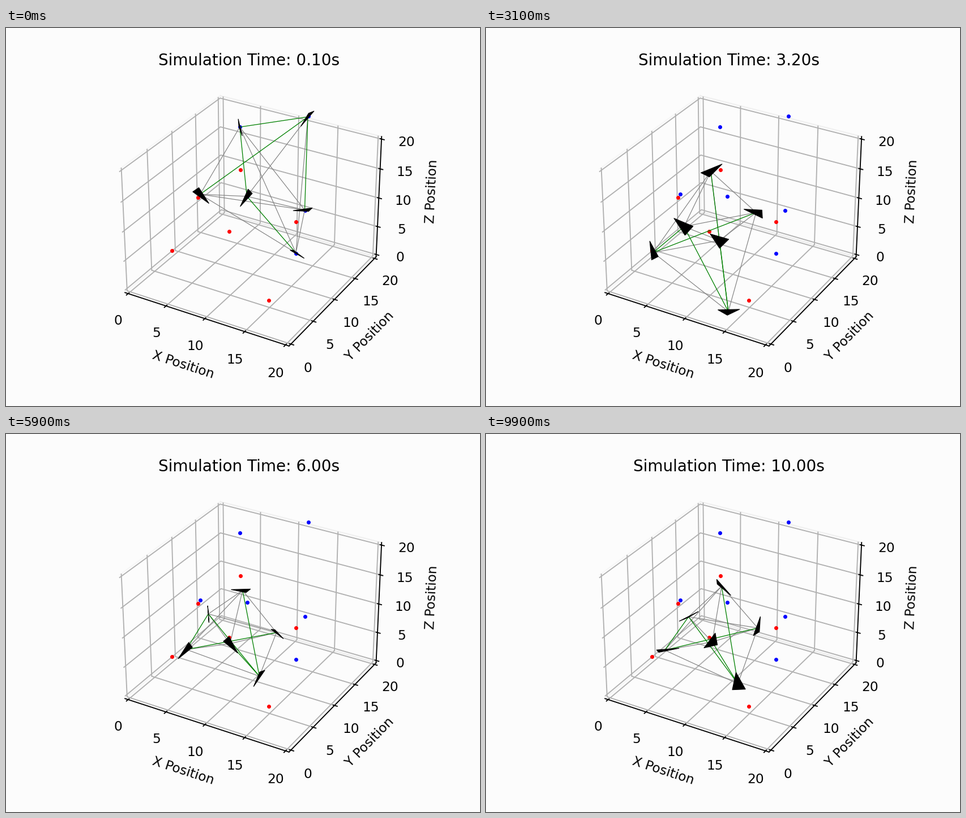
Animation of 837 by 669 pixels, one loop 10000 ms. Source, as a matplotlib script:

```python
from itertools import combinations

import matplotlib.pyplot as plt
import numpy as np
from matplotlib.animation import FuncAnimation
from matplotlib.collections import LineCollection, PolyCollection

W, H, DPI = 837, 669, 167.4
FRAMES, STEP, SUBSTEPS = 100, 0.1, 20

# Motion: a spring to each goal, drag, and a weak pull between neighbours
SPRING, DRAG, PULL = 0.97, 0.94, 0.11
TREE = [(0, 1), (0, 4), (0, 5), (1, 2), (2, 3)]
LINKS = [p for p in combinations(range(6), 2) if p not in TREE]

# Bodies: flat triangles tumbling about a body axis close to the wing line
UNIT = np.array([15.9, 13.04])          # pixels per data unit on screen
NOSE, WING = 1.6, 0.82                  # lengths in data units
PERIOD, LEVEL_TIME = 1.185, 2.4

STARTS = np.array([(533, 155), (412.5, 174), (425.5, 297),
                   (511.5, 398), (527.5, 322), (342, 293.5)])
GOALS = np.array([(463, 481), (338.5, 299), (292.5, 393),
                  (511.5, 342), (413, 250.5), (393, 359)])
NOSES = np.array([(-6, 20), (-4.5, 13.5), (-19, 13),
                  (7.5, 12.5), (-18.5, -6), (9.5, 16.5)])
WINGS = np.array([(4, -0.5), (0.5, 7.5), (2.5, 5),
                  (4, 1), (-5, 3), (-4.5, 5)])


def simulate():
    """Positions of all agents, one entry per frame."""
    pull = np.zeros((6, 6))
    for i, j in TREE + [(1, 3)]:
        pull[[i, j], [j, i]] += PULL
        pull[[i, j], [i, j]] -= PULL
    pos, vel = STARTS.copy(), np.zeros((6, 2))
    dt = STEP / SUBSTEPS
    path = []
    for _ in range(FRAMES):
        for _ in range(SUBSTEPS):
            vel += dt * (SPRING * (GOALS - pos) - DRAG * vel + pull @ pos)
            pos += dt * vel
        path.append(pos.copy())
    return path


def lift(v, length):
    """Add the depth that gives screen vectors their full length."""
    depth = np.sqrt(np.clip(length**2 - (v**2).sum(1), 0, None))
    return np.column_stack([v, depth])


def unit(v):
    return v / np.linalg.norm(v, axis=1, keepdims=True)


def spin(v, axis, angle):
    along = (v * axis).sum(1, keepdims=True) * axis
    return along + (v - along) * np.cos(angle) + np.cross(axis, v) * np.sin(angle)


path = simulate()
nose, wing = lift(NOSES / UNIT, NOSE), lift(WINGS / UNIT, WING)
wing[:, 2] *= np.where((nose * wing)[:, :2].sum(1) > 0, -1, 1)
axes = unit(0.92 * unit(wing) + 0.39 * unit(np.cross(nose, wing)))


def outlines(t, pos):
    angle = 2 * np.pi * (t - LEVEL_TIME) / PERIOD
    n, w = (spin(v, axes, angle)[:, :2] * UNIT for v in (nose, wing))
    return np.stack([pos + n, pos + w - n / 2, pos - w - n / 2], axis=1)


# The small excess keeps the canvas from rounding down a pixel
fig = plt.figure(figsize=((W + 0.01) / DPI, (H + 0.4) / DPI), dpi=DPI,
                 facecolor="#fcfcfc")
ax = fig.add_subplot(projection="3d", facecolor="none")
margin = 20 / 48
lim = (-margin, 20 + margin)
ax.set(xlim=lim, ylim=lim, zlim=lim,
       xlabel="X Position", ylabel="Y Position", zlabel="Z Position")
for axis in (ax.xaxis, ax.yaxis, ax.zaxis):
    axis.set_ticks(range(0, 21, 5))
    axis.pane.fill = False
title = ax.set_title("")

# Screen-space layer, y pointing down
top = fig.add_axes([0, 0, 1, 1])
top.set(xlim=(-0.5, W - 0.5), ylim=(H - 0.5, H - 0.5 - fig.bbox.height))
top.axis("off")
for pts, color in ((STARTS, "blue"), (GOALS, "red")):
    top.plot(*pts.T, "o", color=color, ms=2, mew=1, zorder=1)
links = top.add_collection(LineCollection([], colors="gray", linewidths=0.5, zorder=2))
tree = top.add_collection(LineCollection([], colors="green", linewidths=0.55, zorder=3))
bodies = top.add_collection(
    PolyCollection([], facecolors="black", edgecolors="black", linewidths=0.5, zorder=4))


def update(k):
    t, pos = (k + 1) * STEP, path[k]
    links.set_segments([pos[list(p)] for p in LINKS])
    tree.set_segments([pos[list(p)] for p in TREE])
    bodies.set_verts(outlines(t, pos))
    title.set_text(f"Simulation Time: {t:.2f}s")
    return links, tree, bodies, title


anim = FuncAnimation(fig, update, frames=FRAMES, interval=100, repeat=True,
                     repeat_delay=0, blit=False)
plt.show()
```
